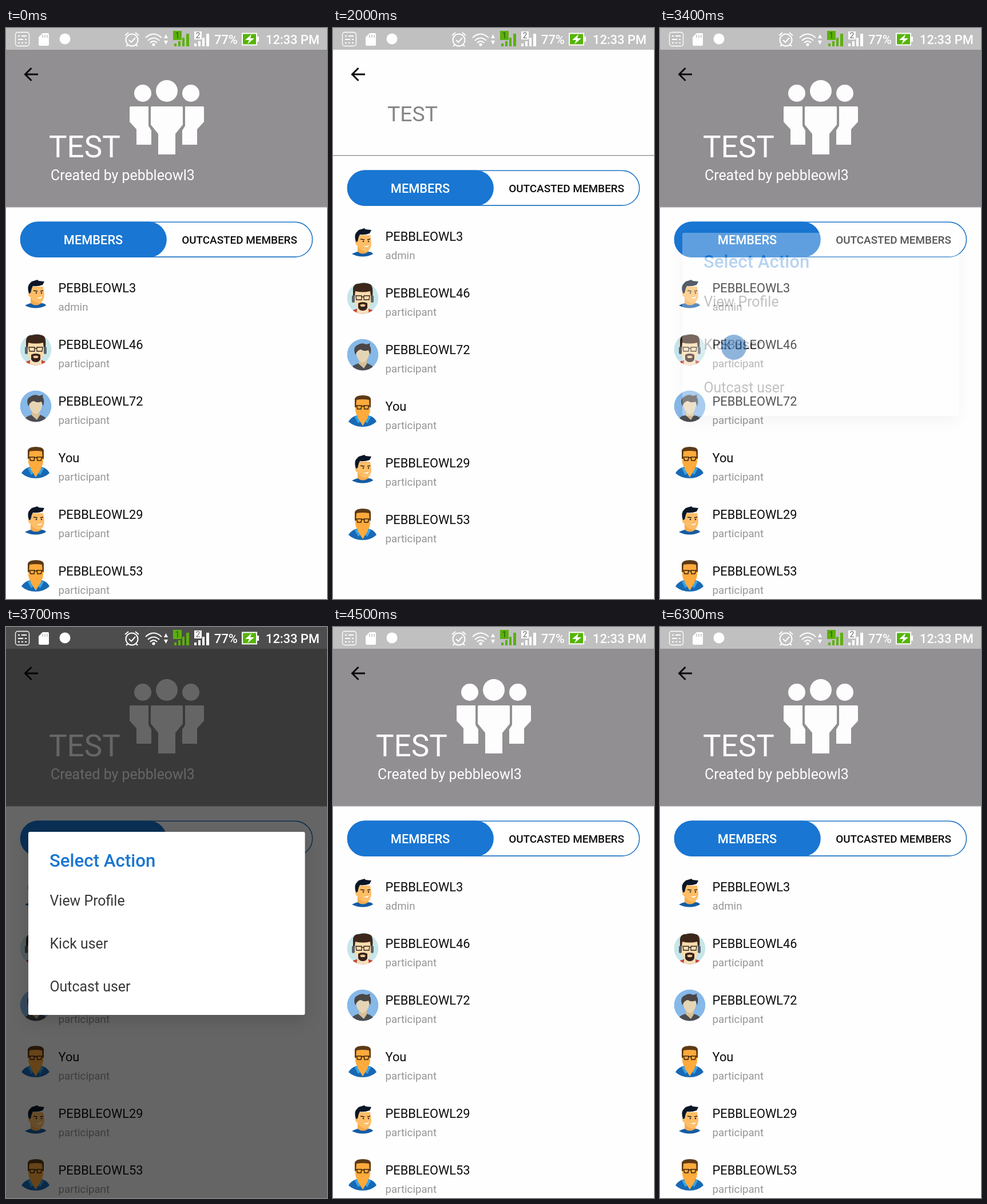
An HTML page that plays this animation: 561x998 px, repeating every 6.7 s.

```html
<!DOCTYPE html>
<html lang="en">
<head>
<meta charset="utf-8">
<title>Group members</title>
<style>
html, body { margin: 0; height: 100%; overflow: hidden; background: #fff; }
svg { display: block; }
text { font-family: Roboto, sans-serif; }
.medium { font-weight: 500; }
.name { font-size: 21.8px; fill: #0c0c0c; }
.role { font-size: 18.7px; fill: #969696; }
.item { font-size: 24.9px; fill: #383838; }
.line { fill: none; stroke: #fff; stroke-width: 2; }
#people { filter: blur(.6px); }
#dialog { filter: drop-shadow(0 10px 14px rgba(0, 0, 0, .14)); }
</style>
</head>
<body>
<svg width="561" height="998" viewBox="0 0 561 998">
  <defs>
    <clipPath id="round"><circle r="27.5"/></clipPath>
    <path id="bars" d="M294 27H298V32H294ZM301 23H305V32H301ZM308 17H312V32H308ZM315 10H320V32H315Z"/>

    <g id="smiling">
      <path d="M-19 22Q-11 18-8 18H10Q16 18 18 22Q0 31-19 22Z" fill="#145ca5"/>
      <path d="M-9 8V18Q0 25 10 18V10Z" fill="#f5ab4c"/>
      <path d="M-11-11H13L15 2Q15 15 6 18Q-4 17-9 8Q-15 5-12-2Z" fill="#ffbd66"/>
      <path d="M-12 1Q-16-12-10-17L-7-20 3-23 5-21 15-20 12-14Q4-11-5-12L-7-8-9 0Z" fill="#0b1626"/>
      <path d="M-4-4L3-3M8-3L13-4" stroke="#2b2118" stroke-width="1.6"/>
      <circle cx="1" cy="0" r="1.2" fill="#222"/><circle cx="10" cy="0" r="1.2" fill="#222"/>
      <path d="M1 8Q7 9 11 6Q9 13 1 8Z" fill="#fff"/>
    </g>

    <g id="bearded" clip-path="url(#round)">
      <circle r="27.5" fill="#c6e6ea"/>
      <path d="M-21 28L-17 21-8 18H8L17 21 21 28Z" fill="#c94536"/>
      <path d="M-9 14H9L11 28H-11Z" fill="#f5dfbc"/>
      <path d="M-14-14H14V8Q12 18 0 21Q-12 18-14 8Z" fill="#fcdbab"/>
      <path d="M-17-3V-17Q-15-26-7-25Q2-28 11-25Q19-24 17-3H14L13-12Q0-9-13-12L-14-3Z" fill="#3d271b"/>
      <path d="M-8 9Q0 5 8 9V17Q6 22 0 22Q-6 22-8 17Z" fill="#35221a"/>
      <path d="M-5 12Q0 9 5 12L3 15H-3Z" fill="#f3c696"/>
      <path d="M-12-4H-2V3H-11ZM2-4H12L11 3H2ZM-2-2H2" fill="none" stroke="#2b2320" stroke-width="1.3"/>
      <rect x="-19" y="-5" width="5" height="13" rx="2.5" fill="#59636d"/>
      <rect x="14" y="-5" width="5" height="13" rx="2.5" fill="#59636d"/>
    </g>

    <g id="faceless" clip-path="url(#round)">
      <circle r="27.5" fill="#86b8e8"/>
      <path d="M-22 28Q-20 18-7 15H7Q19 18 21 28Z" fill="#4b4d52"/>
      <path d="M-6 8H7V16L2 24-7 16Z" fill="#d7bf98"/>
      <path d="M-11-10H11V0Q9 11 0 14Q-9 11-11 0Z" fill="#e6d5b4"/>
      <path d="M-13 0Q-18-13-9-17Q-2-22 6-18L13-20 12-16Q16-11 13 0L10-8Q2-5-3-9Q-9-9-13 0Z" fill="#4a4746"/>
    </g>

    <g id="glasses">
      <path d="M-25 18Q-21 10-10 7H10Q21 10 24 18Q14 27 0 27Q-15 27-25 18Z" fill="#1769b5"/>
      <path d="M-9 6L-14 10-8 21-4 18 0 26 4 18 8 21 14 10 9 6Z" fill="#37a3e4"/>
      <path d="M-13-24H13V-2Q12 6 9 8V11L0 25-9 11V8Q-12 6-13-2Z" fill="#ffaa3c"/>
      <path d="M-14-7V-22Q-12-28 0-28Q13-28 14-22V-7H12L11-20Q0-22-11-20L-12-7Z" fill="#5c3a17"/>
      <path d="M-11-10H-2L-3-4H-9ZM2-10H11L9-4H3ZM-2-9H2" fill="none" stroke="#3a240f" stroke-width="1.6"/>
    </g>
  </defs>

  <rect width="561" height="998" fill="#fefefe"/>

  <g id="list">
    <rect x="25.5" y="339.3" width="510" height="60.8" rx="30.4" fill="#fff" stroke="#2277c8" stroke-width="1.6"/>
    <rect x="24.8" y="338.6" width="256" height="62.2" rx="31" fill="#1976d2"/>
    <text class="medium" x="152.5" y="378" font-size="21.8" text-anchor="middle" fill="#fff">MEMBERS</text>
    <text class="medium" x="408" y="377" font-size="18.9" text-anchor="middle" fill="#0c0c0c">OUTCASTED MEMBERS</text>
  </g>

  <svg id="header" y="38" width="561">
    <rect width="561" height="275" fill="#918f91"/>
    <g id="people" fill="#fdfdfd">
      <circle cx="281" cy="72" r="19"/>
      <circle cx="239" cy="76" r="15"/>
      <circle cx="323" cy="76" r="15"/>
      <path d="M255 99H307Q309 99 309 101V131L296 147V183H266V147L253 131V101Q253 99 255 99Z"/>
      <path id="side" d="M218 99H249V133L254 141V166H228V139L216 126V101Q216 99 218 99Z"/>
      <use href="#side" transform="translate(562) scale(-1 1)"/>
    </g>
    <text id="creator" x="78" y="227.5" font-size="24.9" fill="#fff">Created by pebbleowl3</text>
    <rect id="scrim" width="561" height="275" fill="#fefefe"/>
  </svg>
  <rect id="edge" width="561" height="1.5" fill="#9c9a9c"/>
  <text id="title">TEST</text>
  <path d="M56 81H34M44.5 70L33.5 81 44.5 92" fill="none" stroke="#0a0a0a" stroke-width="3"/>
  <rect width="561" height="38" fill="#c1c0c1"/>

  <circle id="touch" cx="129" cy="558" r="22" fill="#1d68b8" opacity=".7"/>
  <rect id="dim" width="561" height="998"/>

  <g id="dialog">
    <rect x="39" y="358" width="483.5" height="320" rx="3" fill="#fff"/>
    <text class="medium" x="76" y="419" font-size="31.2" fill="#1976d2">Select Action</text>
    <text class="item" x="76.5" y="487">View Profile</text>
    <text class="item" x="76.5" y="562">Kick user</text>
    <text class="item" x="76.5" y="637">Outcast user</text>
  </g>

  <g fill="#fff">
    <rect class="line" x="16.5" y="7.5" width="24" height="24" rx="4" style="stroke-width:1.3"/>
    <path class="line" d="M21 14H24M27 14H36M21 20H30M33 20H36M21 26H24M27 26H30M33 26H36"/>
    <path d="M64 9H73Q75 9 75 11V29Q75 31 73 31H59Q57 31 57 29V16Z"/>
    <path d="M64 12V17M68 12V17M72 12V17" stroke="#c1c0c1" stroke-width="1.5"/>
    <circle cx="103" cy="19" r="9.5"/>
    <circle class="line" cx="220" cy="21" r="10.5"/>
    <path class="line" d="M208 13L214 8M232 13L226 8M215 21L219 25 226 17M213 29L210 32M227 29L230 32"/>
    <path class="line" d="M244 17Q258 4 272 17M248 22Q258 13 268 22M252 26Q258 20 264 26"/>
    <circle cx="258" cy="29" r="2.6"/>
    <path d="M276 18L279.5 11 283 18ZM276 22L279.5 29 283 22Z"/>
    <use href="#bars" fill="#5cb00c"/>
    <use href="#bars" x="35"/>
    <rect x="292" y="5" width="15" height="16" fill="#5cb00c"/>
    <text class="medium" x="299.5" y="18" font-size="14" text-anchor="middle" fill="#2f6a08">1</text>
    <rect x="329" y="6" width="13" height="14"/>
    <text class="medium" x="335.5" y="18" font-size="14" text-anchor="middle" fill="#888">2</text>
    <text class="medium" x="364" y="28" font-size="21.8">77%</text>
    <rect x="413" y="9.5" width="25" height="20" fill="#55b406" stroke="#fff" stroke-width="2"/>
    <rect x="439" y="15" width="3" height="9"/>
    <path d="M429 11L418 21H425L422 28 434 18H427Z"/>
    <text class="medium" x="454" y="28" font-size="21.8">12:33 PM</text>
  </g>
</svg>

<script>
const $ = id => document.getElementById(id);
const set = (id, attrs) => {
  for (const key in attrs) $(id).setAttribute(key, attrs[key]);
};

const members = [
  ["PEBBLEOWL3", "admin", "smiling"],
  ["PEBBLEOWL46", "participant", "bearded"],
  ["PEBBLEOWL72", "participant", "faceless"],
  ["You", "participant", "glasses"],
  ["PEBBLEOWL29", "participant", "smiling"],
  ["PEBBLEOWL53", "participant", "glasses"],
];
$("list").insertAdjacentHTML("beforeend", members.map(([name, role, avatar], i) => `
  <g transform="translate(0 ${i * 99})">
    <use href="#${avatar}" x="52" y="463"/>
    <text class="name" x="91.5" y="462">${name}</text>
    <text class="role" x="91.5" y="494">${role}</text>
  </g>`).join(""));

// Each track is a flat run of time, value pairs
const scroll = [1200, 0, 1300, 49, 1400, 108, 1500, 150, 1600, 172, 1700, 176,
  1800, 162, 1900, 130, 2000, 90, 2100, 52, 2200, 24, 2300, 8, 2400, 0];
const scrim = [1400, 0, 1600, .25, 1800, .65, 1900, 1, 2000, 1, 2100, .7, 2200, .4, 2400, .12, 2600, 0];
const dialog = [3300, 0, 3400, .3, 3500, .8, 3600, 1, 4200, 1, 4300, .2, 4400, 0];
const dim = [3400, 0, 3700, .6, 4200, .6, 4500, 0];

function valueAt(track, t) {
  if (t <= track[0]) return track[1];
  for (let i = 2; i < track.length; i += 2) {
    if (t <= track[i]) {
      const part = (t - track[i - 2]) / (track[i] - track[i - 2]);
      return track[i - 1] + (track[i + 1] - track[i - 1]) * part;
    }
  }
  return track[track.length - 1];
}

function draw(t) {
  const offset = valueAt(scroll, t);
  const collapse = offset / 188;
  const eased = 1 - (1 - collapse) ** 2;
  const shade = Math.round(255 * (1 - collapse));

  set("list", { transform: `translate(0 ${-offset})` });
  set("header", { height: 274 - offset });
  set("edge", { y: 312 - offset });
  set("people", { transform: `translate(0 ${-offset / 2})` });
  set("creator", { transform: `translate(0 ${-offset})` });
  set("scrim", { opacity: valueAt(scrim, t) });
  set("title", {
    x: 75 + 27.5 * eased,
    y: 226 - 131 * collapse,
    "font-size": 53 - 21.5 * eased,
    fill: `rgb(${shade},${shade},${shade})`,
  });
  set("touch", { visibility: t >= 3100 && t < 3500 ? "visible" : "hidden" });
  set("dim", { opacity: valueAt(dim, t) });
  set("dialog", { opacity: valueAt(dialog, t) });
}

// The picture advances ten times a second
function tick() {
  draw(Math.floor(performance.now() % 6700 / 100) * 100);
  requestAnimationFrame(tick);
}
tick();
</script>
</body>
</html>
```
